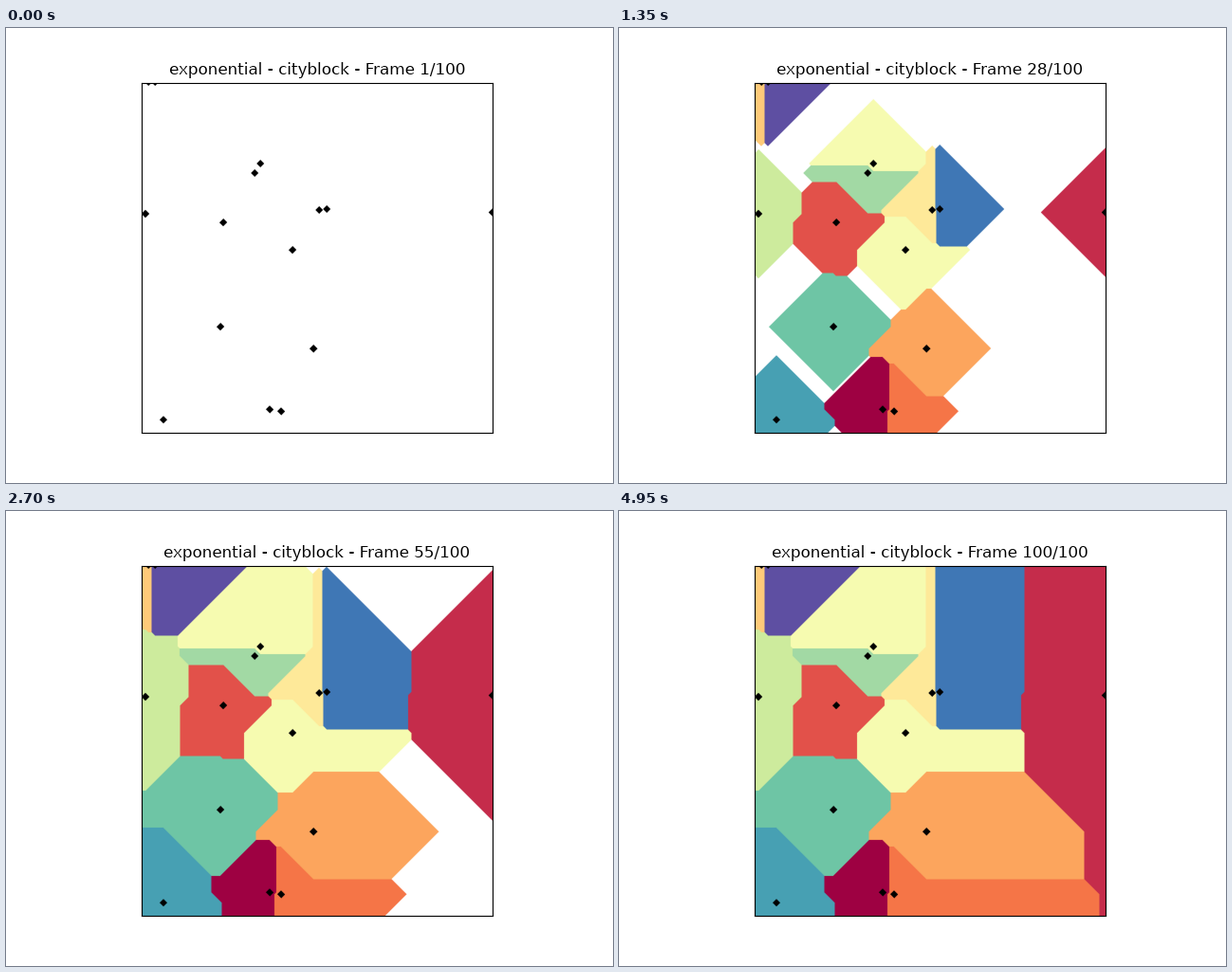
A matplotlib script that plays this animation: 640 by 480 pixels, repeating every 5 s.

```python
import numpy as np
import matplotlib.pyplot as plt
from matplotlib.animation import FuncAnimation

FRAMES = 100
LEFT, RIGHT, TOP, BOTTOM = 143.2, 512.8, 57.6, 427.2   # plot box in stage pixels
GRID = 740
DOT = 4.1                     # radius of the black seed marks
START, GROWTH = 3.8, 2.377    # cell radius and its gain per frame

plt.rcParams["text.hinting"] = "default"   # keeps the title's lowercase low

# Seed points, ordered along the colour map from red to violet
seeds = np.array([
    (278, 402), (512.6, 194.5), (229, 205), (290, 404), (324, 338),
    (150, 57), (330, 192), (302, 234), (268, 143), (147, 196),
    (262, 153), (226, 315), (166, 413), (338, 191), (157, 57),
]) + (0.2, 0.5)

colors = plt.get_cmap("Spectral")(np.linspace(0, 1, len(seeds)))[:, :3]
colors[7:9] = colors[7:9].mean(axis=0)   # the two middle cells share one cream
colors = np.round(colors * 255).astype(np.uint8)


def centers(lo, hi):
    """Midpoints of GRID equal steps between lo and hi."""
    return lo + (np.arange(GRID) + 0.5) * (hi - lo) / GRID


xs, ys = np.meshgrid(centers(LEFT, RIGHT), centers(TOP, BOTTOM))
dist = np.array([abs(xs - x) + abs(ys - y) for x, y in seeds])
nearest = dist.min(axis=0)
cells = colors[dist.argmin(axis=0)]
cells[nearest <= DOT] = 0


def picture(i):
    """Each cell grows as a diamond until it meets its neighbours."""
    radius = max(START + GROWTH * i, DOT)
    return np.where((nearest <= radius)[..., None], cells, np.uint8(255))


fig, ax = plt.subplots(figsize=(6.4, 4.8), dpi=100)
image = ax.imshow(picture(0), extent=(LEFT, RIGHT, BOTTOM, TOP),
                  interpolation="antialiased")
ax.set_xticks([])
ax.set_yticks([])
title = ax.set_title("", fontsize=12.1)


def draw(i):
    image.set_data(picture(i))
    title.set_text(f"exponential - cityblock - Frame {i + 1}/{FRAMES}")
    return image, title


anim = FuncAnimation(fig, draw, frames=FRAMES, interval=50, repeat=True)
plt.show()
```
